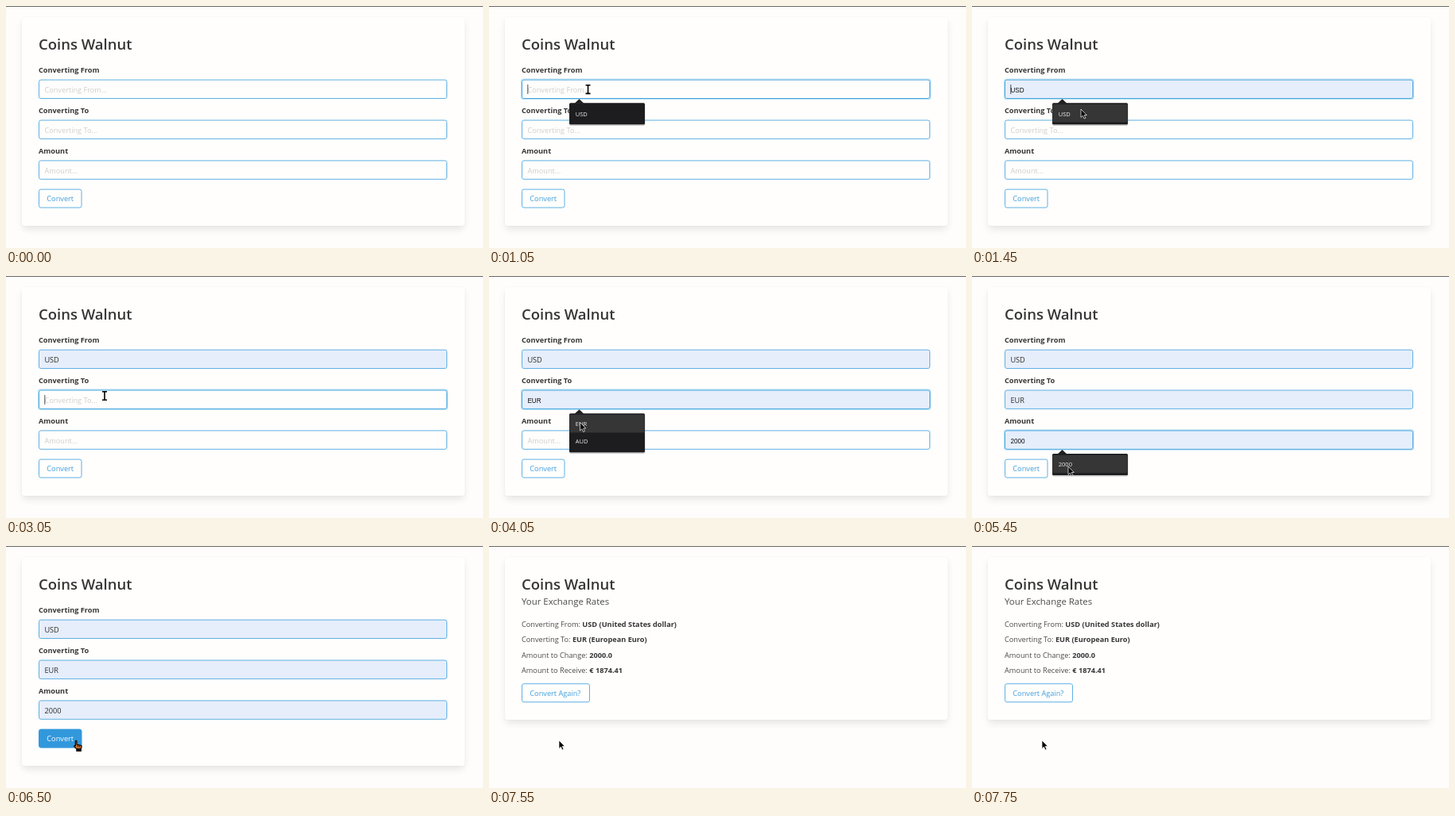
Recreate the animation shown at these times as an HTML page. Size 600x305 px, loop 8000 ms.

```html
<!DOCTYPE html>
<html lang="en">
<head>
<meta charset="utf-8">
<title>Currency form</title>
<style>
  html, body { margin: 0; width: 100%; height: 100%; overflow: hidden; background: #fefdfc; }
  #stage { position: relative; width: 600px; height: 305px; overflow: hidden; }
  #card {
    position: absolute; left: 19.5px; top: 14px; width: 557px; height: 262.5px;
    border-radius: 3px; background: #fffefd;
    box-shadow: 0 5px 10px -1px rgba(10,10,10,.1), 0 0 0 .6px rgba(10,10,10,.02);
  }
  svg { position: absolute; inset: 0; }
  text { font: 9.2px "Open Sans", "Noto Sans", sans-serif; fill: #4a4a4a; white-space: pre; }
  .title { font-size: 18.5px; font-weight: 600; fill: #363636; }
  .subtitle { font-size: 11.42px; }
  .label, .strong { font-weight: 700; fill: #363636; }
  .value { fill: #2b2b2b; }
  .value.empty { fill: #cfcecd; }
  .value.preview { font: 8.13px "Liberation Sans", Arial, sans-serif; fill: #111; }
  .box { fill: #fffefd; stroke: #5fb0e2; stroke-width: 1; }
  .box.filled { fill: #e6eefb; }
  .box.focused { stroke: #45a5de; }
  .ring { fill: none; stroke: #32a8dc; stroke-opacity: .32; stroke-width: 1.2; }
  .button-text { fill: #3f9edc; }
  .hover .box { fill: #3298dc; stroke: #3298dc; }
  .hover .button-text { fill: #fff; }
  .menu text { font-size: 7.5px; fill: #eee; }
</style>
</head>
<body>
<div id="stage">
  <div id="card"></div>
  <svg id="view" width="600" height="305" viewBox="0 0 600 305"></svg>
</div>
<script>
const LOOP = 8000, STEP = 50;
const PRESS = 6450, RELEASE = 6950, RESULT = 7550;

// Times in ms: focus, blur, menu opens, option picked, caret hidden.
const fields = [
  { y: 92.7, name: 'Converting From', options: ['USD'], focus: 900, blur: 2750, open: 1000, pick: 2350, caretEnd: 2000 },
  { y: 143.6, name: 'Converting To', options: ['EUR', 'AUD'], focus: 2750, blur: 4650, open: 3300, pick: 4250, caretEnd: 3300 },
  { y: 194.5, name: 'Amount', options: ['2000'], focus: 4650, blur: PRESS, open: 4900, pick: 5950, caretEnd: 4900 }
];

// Pointer path: time, x, y.
const path = [
  [50, 160, 232], [850, 124, 104], [1000, 124, 104], [1400, 137, 130],
  [2350, 137, 130], [2400, 124, 151], [3300, 124, 151], [3500, 114.5, 184.5],
  [4250, 114.5, 184.5], [4300, 121, 206], [5100, 121, 206], [5450, 121, 240],
  [6000, 121, 240], [6450, 88, 245], [7550, 88, 245]
];

const rect = (x, y, w, h, cls, r = 2.4) =>
  `<rect class="${cls}" x="${x}" y="${y}" width="${w}" height="${h}" rx="${r}"/>`;
const text = (x, y, s, cls = '') => `<text class="${cls}" x="${x}" y="${y}">${s}</text>`;
const button = (id, y, w, label) => `<g id="${id}">
  ${rect(40.4, y - .6, w + 1.2, 25.2, 'ring', 3)}${rect(41.5, y + .5, w - 1, 23, 'box')}
  ${text(51.3, y + 15.6, label, 'button-text')}</g>`;

const fieldMarkup = (f, i) => `<g id="field${i}">
  ${text(41, f.y - 8.5, f.name, 'label')}
  ${rect(40.4, f.y - .7, 515.2, 25.4, 'ring', 3)}
  ${rect(41.5, f.y + .4, 513, 23.4, 'box')}
  ${text(48.4, f.y + 16, '', 'value')}
  <path class="caret" d="M48.8 ${f.y + 6.3}v12" stroke="#222" stroke-width=".8"/></g>`;

const menuMarkup = (f, i) => {
  const top = f.y + 29.6, h = 5 + 22 * f.options.length;
  return `<g id="menu${i}" class="menu">
    <rect x="101" y="${top + .5}" width="95.4" height="${h + 1}" rx="2" fill="#000" opacity=".25"/>
    <path d="M107.5 ${top + .5}l6-5.5 6 5.5z" fill="#1f1f20"/>
    ${rect(101, top, 95, h, 'back', 1.5)}
    <rect class="row" x="101.4" y="${top + 1.6}" width="94.2" height="22.6" fill="#363636"/>
    ${f.options.map((o, k) => text(108.8, top + 16.2 + 22 * k, o)).join('')}</g>`;
};

const resultLine = ([label, value], i) =>
  `<text x="41" y="${101.8 + 19.35 * i}">${label}: <tspan class="strong">${value}</tspan></text>`;

const view = document.getElementById('view');
view.innerHTML = `
  <rect width="600" height="1" fill="#686767"/>
  ${text(41, 55.4, 'Coins Walnut', 'title')}
  <g id="form">
    ${fields.map(fieldMarkup).join('')}
    ${button('convert', 230.6, 54.5, 'Convert')}
    ${fields.map(menuMarkup).join('')}
  </g>
  <g id="result">
    ${text(41, 73.6, 'Your Exchange Rates', 'subtitle')}
    ${[['Converting From', 'USD (United States dollar)'], ['Converting To', 'EUR (European Euro)'],
       ['Amount to Change', '2000.0'], ['Amount to Receive', '€ 1874.41']].map(resultLine).join('')}
    ${button('again', 173.2, 86, 'Convert Again?')}
  </g>
  <g id="pointer">
    <path id="arrow" d="M0 0V10.4L2.4 8.2 4.1 12 5.9 11.2 4.2 7.5H7.3Z"
      fill="#000" stroke="#fff" stroke-width=".7"/>
    <path id="beam" d="M-3-5.3H3M-3 5.3H3M0-5.3V5.3" fill="none" stroke="#000" stroke-width="1.6"/>
    <g id="hand">
      <path d="M-.7 1Q0-.5 1 1V5.2L6.2 6.2Q7.4 6.7 7 8.6L6.3 11H.7L-2.3 7.3Q-2 5.8-.7 6.8Z"
        fill="#c4682e" stroke="#000" stroke-width="1.1" stroke-linejoin="round"/>
      <path d="M2.6 5.8v2.4M4.5 6.2v2.2" stroke="#000" stroke-width=".7"/>
      <rect x=".3" y="10.3" width="6.6" height="3.7" fill="#0b0b0b"/>
    </g>
  </g>`;

const $ = sel => view.querySelector(sel);
const show = (el, on) => { el.style.display = on ? '' : 'none'; };
const between = (t, a, b) => t >= a && t < b;

function pointerAt(t) {
  const next = path.findIndex(p => p[0] > t);
  if (next < 0) return path[path.length - 1].slice(1);
  const [t0, x0, y0] = path[Math.max(0, next - 1)], [t1, x1, y1] = path[next];
  const k = Math.max(0, (t - t0) / (t1 - t0)), e = k * k * (3 - 2 * k);
  return [x0 + (x1 - x0) * e, y0 + (y1 - y0) * e];
}

function drawField(f, i, t, x, y) {
  const el = $('#field' + i), top = f.y + 29.6;
  const open = between(t, f.open, f.pick);
  const hover = open && x > 101 && x < 196 && between(y, top, top + 27);
  const picked = t >= f.pick, focused = between(t, f.focus, f.blur);
  const value = el.querySelector('.value'), box = el.querySelector('.box');
  value.textContent = picked || hover ? f.options[0] : f.name + '...';
  value.setAttribute('class', 'value' + (picked ? '' : hover ? ' preview' : ' empty'));
  box.classList.toggle('filled', picked || hover);
  box.classList.toggle('focused', focused);
  show(el.querySelector('.ring'), focused);
  show(el.querySelector('.caret'), between(t, f.focus, f.caretEnd));
  show($('#menu' + i), open);
  $('#menu' + i + ' .back').setAttribute('fill', '#1d1d1f');
  show($('#menu' + i + ' .row'), hover);
  return open;
}

function draw(t) {
  const [x, y] = pointerAt(t), done = t >= RESULT;
  const menuOpen = fields.map((f, i) => drawField(f, i, t, x, y)).some(Boolean);
  const overButton = !done && x < 95.5 && between(y, 230, 255);
  const inField = fields.some(f => between(y, f.y, f.y + 24.4));
  const overMenu = menuOpen && fields.some(f => between(t, f.open, f.pick) && y > f.y + 29);
  const beam = !done && !overButton && !overMenu && inField;

  show($('#form'), !done);
  show($('#result'), done);
  document.getElementById('card').style.height = (done ? 205 : 262.5) + 'px';
  $('#convert').classList.toggle('hover', overButton);
  show($('#convert .ring'), t >= RELEASE);
  show($('#again .ring'), false);

  show($('#pointer'), t >= 50);
  $('#pointer').setAttribute('transform', `translate(${x} ${y})`);
  show($('#arrow'), !beam && !overButton);
  show($('#beam'), beam);
  show($('#hand'), overButton);
}

const start = performance.now();
function tick() {
  const t = (performance.now() - start) % LOOP;
  draw(Math.floor(t / STEP) * STEP);
  requestAnimationFrame(tick);
}
tick();
</script>
</body>
</html>
```
